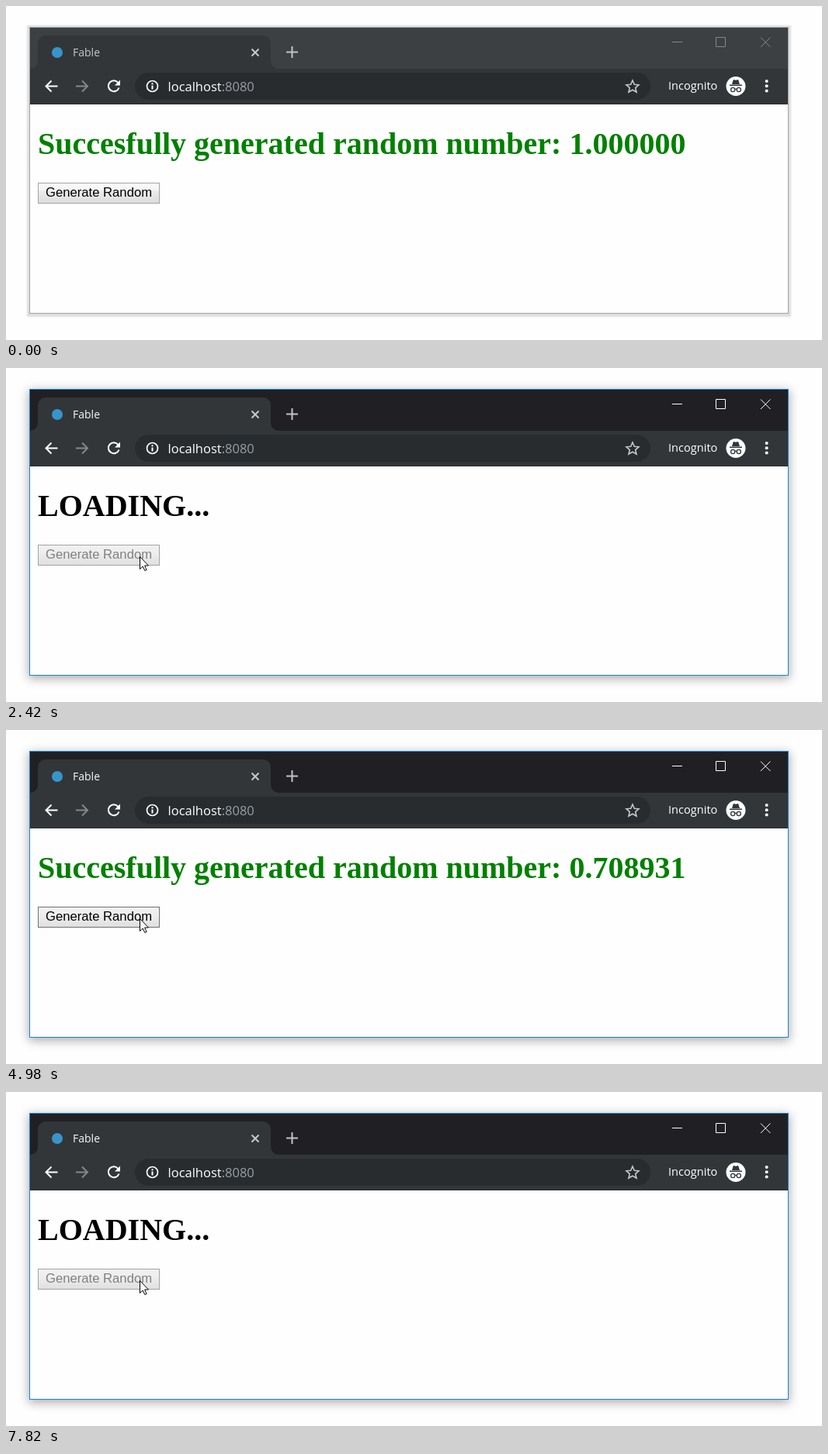
An HTML page that plays this animation: 1051x431 px, repeating every 8000 ms.

```html
<!DOCTYPE html>
<html lang="en">
<head>
<meta charset="utf-8">
<title>Random number</title>
<style>
  html, body { margin: 0; width: 100%; height: 100%; overflow: hidden; background: #fefefe; }
  #window { position: absolute; left: 30px; top: 27px; width: 978px; height: 370px;
    box-shadow: 0 1px 2px 3px rgba(0,0,0,.13); }
  #window.focused { box-shadow: 0 3px 12px 1px rgba(0,0,0,.32); }
  svg { position: absolute; left: 0; top: 0; display: block; }
  .ui { font-family: "Open Sans", "Noto Sans", sans-serif; }
  #heading { font: bold 40px "Liberation Serif", Times, serif; }
  #label { font: 16.667px "Liberation Sans", Arial, sans-serif; }
  .line { fill: none; stroke: #fff; stroke-width: 2; }
</style>
</head>
<body>
<div id="window"></div>
<svg width="1051" height="431" viewBox="0 0 1051 431">
  <defs>
    <linearGradient id="idle" x2="0" y2="1">
      <stop stop-color="#fafafa"/><stop offset=".36" stop-color="#f4f4f4"/>
      <stop offset=".4" stop-color="#ebebeb"/><stop offset="1" stop-color="#dcdcdc"/>
    </linearGradient>
    <linearGradient id="warm" x2="0" y2="1">
      <stop stop-color="#f1f1f1"/><stop offset=".38" stop-color="#eee"/><stop offset="1" stop-color="#dfdfdf"/>
    </linearGradient>
    <linearGradient id="pressed" x2="0" y2="1">
      <stop stop-color="#dcdcdc"/><stop offset="1" stop-color="#e8e8e8"/>
    </linearGradient>
  </defs>

  <rect x="30" y="27" width="978" height="370" fill="#fefefe"/>
  <rect id="titlebar" x="30" y="27" width="978" height="54"/>
  <path fill="#323639" d="M31 81A10 10 0 0 0 41 71V48a10 10 0 0 1 10-10H331a10 10 0 0 1 10 10V71a10 10 0 0 0 10 10H1007V127H31Z"/>
  <path d="M31 126.5H1007" stroke="#292c2f"/>
  <rect x="166" y="86" width="664" height="35" rx="17.5" fill="#282c2f"/>

  <circle cx="66" cy="60" r="7" fill="#3795cb"/>
  <g class="ui">
    <text id="tab" x="86" y="65" font-size="14">Fable</text>
    <text x="208.5" y="109.500" font-size="16.5" fill="#fff">localhost<tspan fill="#9aa0a6">:8080</tspan></text>
    <text x="853" y="108" font-size="14.6" fill="#fff">Incognito</text>
  </g>
  <path class="line" style="stroke:#c6c8ca" d="M316.500 55.500l9 9m0-9l-9 9"/>
  <path class="line" style="stroke:#c0c3c6" d="M361 59.500h15m-7.500-7.500v15"/>
  <path id="controls" fill="none" d="M858 46.500h13M914.500 40.500h12v12h-12ZM972 40.500l12.500 12.500m0-12.500L972 53"/>

  <path class="line" d="M66.500 103.500H52m6.500-7l-7 7 7 7"/>
  <path class="line" style="stroke:#85888b" d="M90 103.500h14.500m-6.500-7l7 7-7 7"/>
  <path class="line" d="M144.500 99a7 7 0 1 0 1 6.500"/>
  <path fill="#fff" d="M147 95.500v7h-7Z"/>
  <circle class="line" style="stroke-width:1.7" cx="188.500" cy="103.500" r="7"/>
  <path class="line" d="M188.500 99.300v1.900m0 1.300v5"/>
  <path class="line" style="stroke:#c6c8ca;stroke-width:1.6" d="M807 96l2.300 5.300 5.700.5-4.300 3.800 1.300 5.600-5-3-5 3 1.300-5.600-4.300-3.800 5.700-.5Z"/>
  <circle cx="940" cy="103.500" r="12.500" fill="#fff"/>
  <path fill="#323639" d="M935 101l1.500-5q.5-1.200 1.700-.8l1.800.5 1.800-.5q1.200-.4 1.700.8l1.500 5ZM932 101.500h16v1.500h-16Z"/>
  <g fill="none" stroke="#323639" stroke-width="1.300">
    <circle cx="936.200" cy="108" r="2.600"/><circle cx="943.800" cy="108" r="2.600"/><path d="M938.800 107.500q1.200-.8 2.400 0"/>
  </g>
  <g fill="#fff"><circle cx="979.700" cy="97" r="2"/><circle cx="979.700" cy="103.300" r="2"/><circle cx="979.700" cy="109.500" r="2"/></g>

  <text id="heading" x="41" y="191"></text>
  <rect id="button" x="41.500" y="228.500" width="156" height="26"/>
  <text id="label" x="51" y="246">Generate Random</text>
  <rect id="frame" x="30.500" y="27.500" width="977" height="369" fill="none"/>
  <path id="cursor" fill="#fff" stroke="#000" d="M.5.5V16.500L4.200 13 6.800 18.500 9.100 17.500 6.600 12H11.500Z"/>
</svg>
<script>
const LOOP = 8000, TICK = 30;
const FOCUS = 2220, TITLE = 2310;
const good = n => ['Succesfully generated random number: ' + n, '#008000'];
const bad = n => ["Could not generate a 'good' random number: " + n, '#dc143c'];
const loading = ['LOADING...', '#000'];

// start time, heading, button state
const steps = [
  [0, good('1.000000'), 'idle'],
  [TITLE, good('1.000000'), 'pressed'],
  [2420, loading, 'disabled'],
  [3400, good('0.905101'), 'warm'],
  [3950, good('0.905101'), 'pressed'],
  [4010, loading, 'disabled'],
  [4980, good('0.708931'), 'warm'],
  [5660, good('0.708931'), 'pressed'],
  [5720, loading, 'disabled'],
  [6690, bad('0.354886'), 'warm'],
  [7760, bad('0.354886'), 'pressed'],
  [7820, loading, 'disabled']
];
// time, x, y of the pointer tip
const path = [
  [110, 901, 408], [890, 509, 297], [1120, 413, 288],
  [1670, 240, 264], [1740, 240, 264], [2190, 172, 243]
];

const el = id => document.getElementById(id);
const set = (id, attrs) => {
  for (const key in attrs) el(id).setAttribute(key, attrs[key]);
};

function pointer(t) {
  const snapped = path[0][0] + Math.floor((t - path[0][0]) / TICK) * TICK;
  const next = path.findIndex(p => p[0] > snapped);
  if (next < 0) return path[path.length - 1].slice(1);
  if (next === 0) return path[0].slice(1);
  const a = path[next - 1], b = path[next];
  const k = (snapped - a[0]) / (b[0] - a[0]);
  return [1, 2].map(i => Math.round(a[i] + (b[i] - a[i]) * k));
}

function draw(t) {
  const [, [text, color], state] = steps.filter(s => s[0] <= t).pop();
  const focused = t >= FOCUS, active = t >= TITLE;
  const [x, y] = pointer(t);
  const hover = x < 198 && y < 255 && state !== 'disabled';

  el('heading').textContent = text;
  set('heading', { fill: color });
  set('button', {
    fill: `url(#${state === 'disabled' ? 'warm' : state})`,
    stroke: hover ? '#707070' : '#a3a3a3'
  });
  set('label', { fill: state === 'disabled' ? '#808080' : '#000' });
  el('window').classList.toggle('focused', focused);
  set('frame', { stroke: focused ? '#1883d7' : '#a5a5a5' });
  set('titlebar', { fill: active ? '#202024' : '#3c4043' });
  set('tab', { fill: active ? '#f8f9fa' : '#c6c8ca' });
  set('controls', { stroke: active ? '#fff' : '#85888a' });
  set('cursor', {
    transform: `translate(${x} ${y})`,
    visibility: t < path[0][0] ? 'hidden' : 'visible'
  });
}

const start = performance.now();
function tick() {
  draw((performance.now() - start) % LOOP);
  requestAnimationFrame(tick);
}
tick();
</script>
</body>
</html>
```
